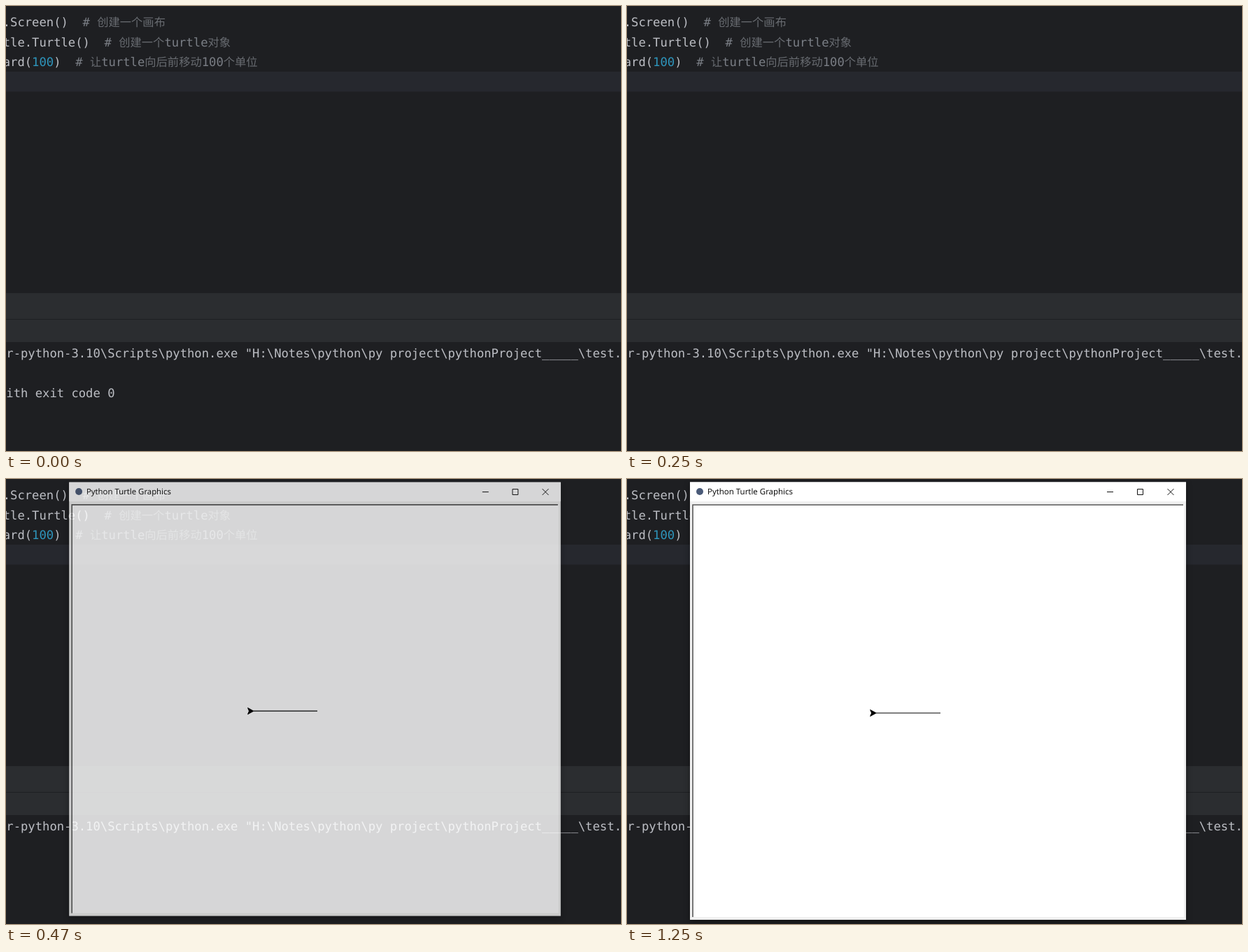
Animation of 879x637 px, one loop 1670 ms. Source, as an HTML page:

```html
<!DOCTYPE html>
<html lang="zh">
<head>
<meta charset="utf-8">
<title>Turtle window opening</title>
<style>
  html, body { margin: 0; width: 100%; height: 100%; overflow: hidden; background: #1e1f22; }
  svg { display: block; }
  text { white-space: pre; text-rendering: geometricPrecision; }
  .code { font: 17.2px "DejaVu Sans Mono", "Noto Sans Mono", monospace; fill: #bcbec4; }
  .note { fill: #7a7e85; }
  .han { font: 300 16.3px "Noto Sans CJK SC", "Noto Sans CJK", sans-serif; fill-opacity: .8; }
  .num { fill: #2e96bd; }
  .title { font: 11.5px "Open Sans", "Noto Sans", sans-serif; }
  #win { filter: drop-shadow(0 4px 5px rgba(0, 0, 0, .35)); }
</style>
</head>
<body>
<svg width="879" height="637" viewBox="0 0 879 637">
  <rect width="879" height="637" fill="#1e1f22"/>
  <rect y="94" width="879" height="28.5" fill="#26282e"/>
  <path d="M0 411h879v37H0zM0 449h879v32H0z" fill="#2b2d30"/>

  <g class="code">
    <text x="-4.3" y="29">.Screen()  <tspan class="note"># <tspan class="han">创建一个画布</tspan></tspan></text>
    <text x="-4.3" y="57.5">tle.Turtle()  <tspan class="note"># <tspan class="han">创建一个</tspan>turtle<tspan class="han">对象</tspan></tspan></text>
    <text x="-4.3" y="86">ard(<tspan class="num">100</tspan>)  <tspan class="note"># <tspan class="han">让</tspan>turtle<tspan class="han">向后前移动</tspan>100<tspan class="han">个单位</tspan></tspan></text>
    <text x=".3" y="502.5">r-python-3.10\Scripts\python.exe "H:\Notes\python\py project\pythonProject_____\test.</text>
    <text id="exit" x=".3" y="560">ith exit code 0</text>
  </g>

  <g id="win">
    <rect x="90" y="4.5" width="709" height="626.5" fill="#f0f0f0"/>
    <rect x="90" y="4.5" width="709" height="27.5" fill="#fff"/>
    <rect x="93" y="36" width="703" height="591" fill="#fff"/>
    <path d="M94 627V37H795" fill="none" stroke="#555" stroke-width="1.6"/>
    <circle cx="104" cy="18" r="5" fill="#4a5a78"/>
    <text class="title" x="115" y="22">Python Turtle Graphics</text>
    <path d="M686 18.5h9M729.5 14.5h8v8h-8zM772.5 14l9 9m0-9l-9 9" fill="none" stroke="#111"/>
    <path id="trail" stroke="#000" stroke-width="1.2"/>
    <path id="turtle" d="M0 0l-8.3-4.6 1.9 4.6-1.9 4.6z" stroke="#000"/>
  </g>
</svg>
<script>
  const LOOP = 1670, EXIT_END = 130, OPEN = 330, STEP = 70;
  const fades = [.85, .415, .18, .065, 0];   // remaining transparency while opening
  const home = 448, lineY = 335;
  const pivot = { x: 112, y: 22 };
  const el = id => document.getElementById(id);
  const set = (id, attrs) => {
    for (const key in attrs) el(id).setAttribute(key, attrs[key]);
  };

  function draw(t) {
    const step = Math.min(fades.length - 1, Math.floor((t - OPEN) / STEP));
    set('exit', { visibility: t < EXIT_END ? 'visible' : 'hidden' });
    set('win', { visibility: step < 0 ? 'hidden' : 'visible' });
    if (step < 0) return;

    const fade = fades[step], scale = 1 - fade / 20;
    set('win', {
      opacity: 1 - fade,
      transform: `translate(${pivot.x * (1 - scale)} ${pivot.y * (1 - scale)}) scale(${scale})`
    });

    const tip = home - Math.min(92, 20 + 52 * step);
    set('trail', { d: `M${tip} ${lineY}H${home}` });
    set('turtle', { transform: `translate(${tip} ${lineY})` });
  }

  const start = performance.now();
  function tick() {
    draw((performance.now() - start) % LOOP);
    requestAnimationFrame(tick);
  }
  tick();
</script>
</body>
</html>
```
